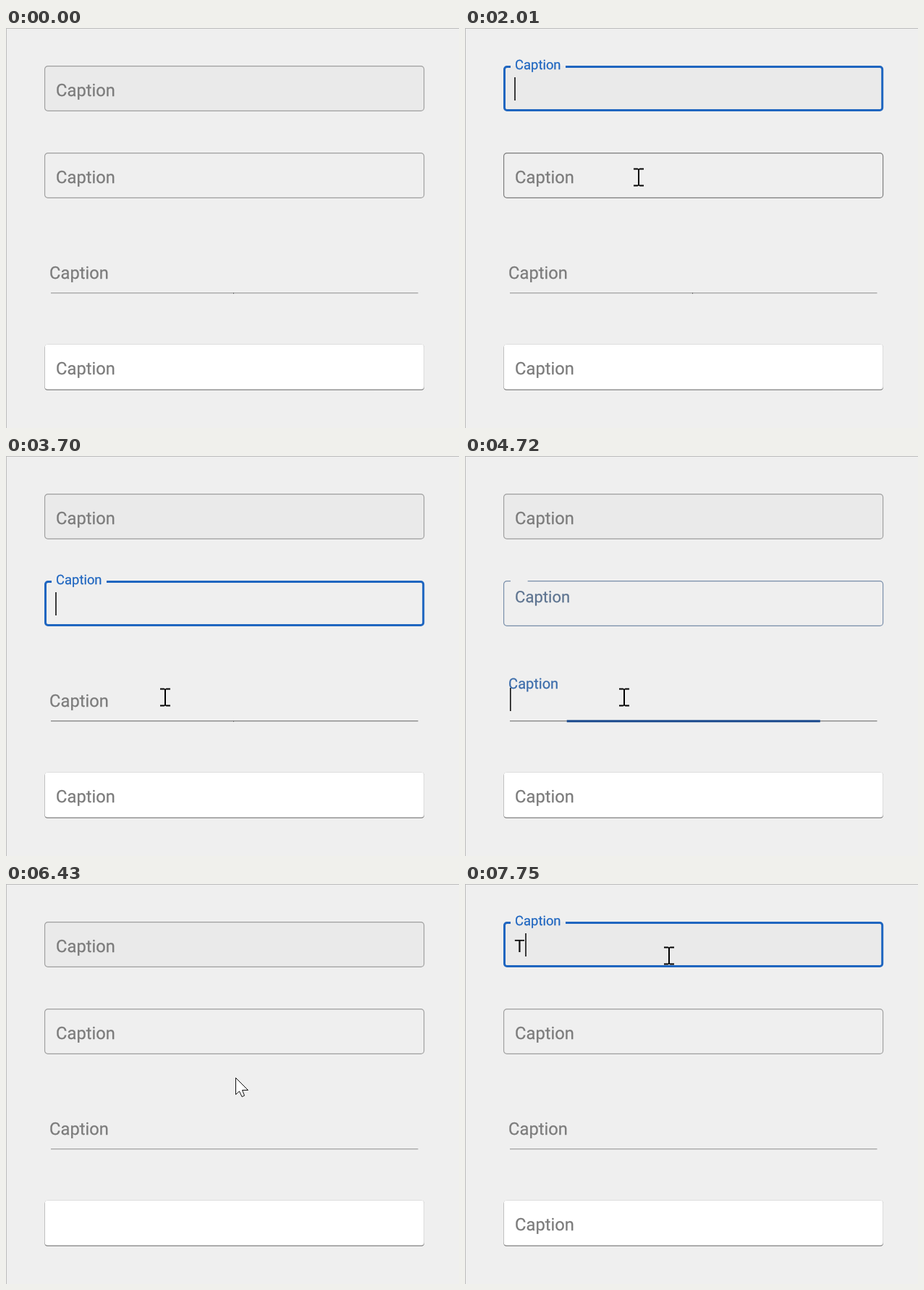
Animation, 626 px wide and 552 px high, one loop 8 s. Source, as an HTML page:

```html
<!DOCTYPE html>
<html lang="en">
<head>
<meta charset="utf-8">
<title>Text fields</title>
<style>
html, body { margin: 0; width: 100%; height: 100%; overflow: hidden; background: #efefef; }
svg { display: block; }
text { font-family: Roboto, sans-serif; text-rendering: geometricPrecision; }
#labels { stroke-width: .25; }
.solo { filter: drop-shadow(0 0 .6px rgba(0,0,0,.45)) drop-shadow(0 1.6px .5px rgba(0,0,0,.5)); }
</style>
</head>
<body>
<svg width="626" height="552" viewBox="0 0 626 552">
  <rect width="626" height="552" fill="#efefef"/>
  <path d="M0 .5H626M.5 0V552" stroke="#bcbcbc"/>
  <rect x="53" y="52" width="525" height="63" rx="5" fill="#eaeaea"/>
  <path id="box0" fill="none"/>
  <path id="box1" fill="none"/>
  <rect id="rule" x="62" y="365.1" width="507.5" height="1.2"/>
  <rect id="dot" x="314" y="365" width="1" height="2" fill="#777"/>
  <rect id="bar" y="364.4" height="3"/>
  <rect class="solo" x="53.5" y="436.7" width="524.3" height="62" rx="4" fill="#fff"/>
  <g id="labels"></g>
  <text id="typed" x="68.2" y="94" font-size="24" fill="#111">T</text>
  <rect id="caret" width="1.6" height="32" fill="#111"/>
  <path id="beam" d="M-7-12.5h5.5l1.5 1 1.5-1H7v2H1v21h6v2H1.5l-1.5-1-1.5 1H-7v-2h6v-21h-6z" fill="#000"/>
  <path id="arrow" d="M.5.5V23.5l5-4.5 3.5 7.5 3.5-1.5-3-7.5h8z" fill="#fff" stroke="#111"/>
</svg>
<script>
const LOOP = 8000, FLOAT = 270, BLINK = 500, TYPED = 7750;
const IDLE = [158, 158, 158], HOVER = [123, 123, 123], BLUE = [31, 102, 192], DARK = [0, 0, 20];
const $ = id => document.getElementById(id);

// from, to: focus time; press: how long the button is held before the caret blinks
const fields = [
  { x: 69.1, y: 94, top: 52, focus: [{ from: 1448, to: 2502, press: 70 }, { from: 6780, to: 9000, press: 100 }] },
  { x: 69.1, y: 214, top: 172, focus: [{ from: 2502, to: 4601, press: 195 }] },
  { x: 60.1, y: 346, top: 304, focus: [{ from: 4601, to: 5830, press: 90 }] },
  { x: 69.1, y: 478, top: 436, focus: [{ from: 5830, to: 6780, press: 70 }] }
];
const boxes = fields.slice(0, 2), line = fields[2], solo = fields[3];

// each pointer move: start, end, x, y
const moves = [
  [40, 450, 256, 91], [1175, 1180, 256, 94], [1750, 2010, 240, 206], [2240, 2400, 237, 213],
  [2750, 3040, 229, 322], [3080, 3400, 220, 333], [4820, 5460, 255, 467],
  [5860, 6040, 263, 470], [6300, 6640, 282, 99]
];

for (const f of fields) {
  f.label = document.createElementNS('http://www.w3.org/2000/svg', 'text');
  f.label.textContent = 'Caption';
  f.label.setAttribute('x', f.x);
  $('labels').append(f.label);
}

const clamp = x => Math.min(1, Math.max(0, x));
const mix = (a, b, p) => `rgb(${a.map((v, i) => Math.round(v + (b[i] - v) * p))})`;
const show = (el, on) => el.setAttribute('visibility', on ? 'visible' : 'hidden');
function set(el, attrs) {
  for (const k in attrs) el.setAttribute(k, attrs[k]);
}

// cubic-bezier(.4, 0, .2, 1)
function ease(x) {
  let lo = 0, hi = 1;
  for (let i = 0; i < 20; i++) {
    const s = (lo + hi) / 2, r = 1 - s;
    if (1.2 * r * r * s + .6 * r * s * s + s * s * s < clamp(x)) lo = s; else hi = s;
  }
  return lo * lo * (3 - 2 * lo);
}

// the hand slows down at the end and swings sideways on long strokes
function pointer(t) {
  let x = 400, y = 590;
  for (const [from, to, x1, y1] of moves) {
    if (t < from) break;
    const p = 1 - (1 - clamp((t - from) / (to - from))) ** 1.65;
    const bow = (y - y1) * .47 * p * (1 - p);
    x += (x1 - x) * p + bow;
    y += (y1 - y) * p;
  }
  return [Math.round(x), Math.round(y)];
}

function outline(top, w, gap) {
  const h = w / 2, l = 53 + h, r = 578.2 - h, y = top + h, b = top + 63 - h, c = 5 - h;
  const arc = (dx, dy) => `a${c} ${c} 0 0 1 ${dx} ${dy}`;
  return `M${63 + gap} ${y}H${r - c}${arc(c, c)}V${b - c}${arc(-c, c)}` +
    `H${l + c}${arc(-c, -c)}V${y + c}${arc(c, -c)}H63`;
}

function drawCaret(t) {
  const f = fields.find(f => f.now), typed = t >= TYPED;
  const blinkStart = f && (typed ? TYPED : f.now.from + f.now.press);
  show($('caret'), f && (t < blinkStart || Math.floor((t - blinkStart) / BLINK) % 2 === 0));
  if (f) set($('caret'), { x: typed ? 83.2 : f === line ? 62 : 68.2, y: f.y - 26 });
  show($('typed'), typed);
}

function draw(t) {
  const [mx, my] = pointer(t);

  for (const f of fields) {
    f.now = f.focus.find(s => t >= s.from && t < s.to);
    f.hover = my >= f.top && my <= f.top + 63;
    f.p = f.focus.reduce((p, s) => p + ease((t - s.from) / FLOAT) - ease((t - s.to) / FLOAT), 0);
    const lift = f === solo ? 0 : f.p, color = mix(HOVER, BLUE, lift);
    set(f.label, { y: f.y - 37 * lift, 'font-size': 23.7 - 5.3 * lift, fill: color, stroke: color });
  }
  show(solo.label, !solo.now);

  boxes.forEach((f, i) => {
    const w = f.now ? 3 : 1.15;
    set($('box' + i), {
      d: outline(f.top, w, 76 * f.p),
      'stroke-width': w,
      stroke: mix(f.now || f.hover ? HOVER : IDLE, BLUE, f.p)
    });
  });
  set($('rule'), { fill: mix(line.hover ? HOVER : IDLE, BLUE, 0) });
  set($('bar'), { x: 315.75 - 254 * line.p, width: 508 * line.p, fill: mix(DARK, BLUE, line.p) });
  show($('dot'), t < line.focus[0].from);
  drawCaret(t);

  const over = fields.some(f => f.hover);
  for (const id of ['beam', 'arrow']) {
    show($(id), over === (id === 'beam'));
    set($(id), { transform: `translate(${mx} ${my})` });
  }
}

let start;
function tick(now) {
  start ??= now;
  draw((now - start) % LOOP);
  requestAnimationFrame(tick);
}
draw(0);
requestAnimationFrame(tick);
</script>
</body>
</html>
```
